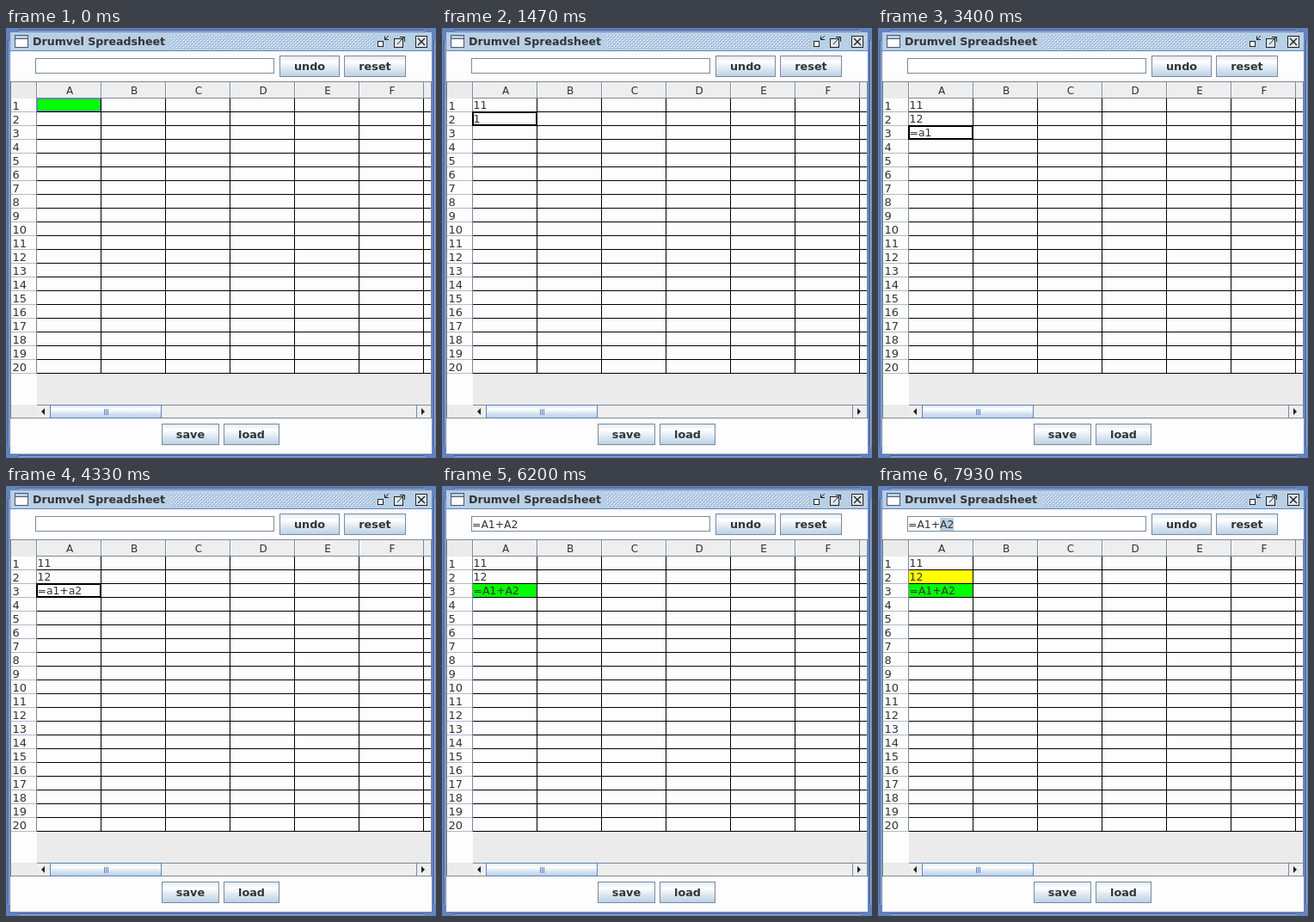
These frames come from a looping animation (500 px wide and 500 px high, 8000 ms). An HTML page with a canvas:

```html
<!DOCTYPE html>
<html lang="en">
<head>
<meta charset="utf-8">
<title>Spreadsheet</title>
<style>
html, body { margin: 0; width: 100%; height: 100%; overflow: hidden; background: #fdfdfe; }
canvas { display: block; width: 100%; height: 100%; }
</style>
</head>
<body>
<canvas id="stage" width="500" height="500"></canvas>
<script>
const ctx = document.getElementById('stage').getContext('2d');
const LOOP = 8000;
const SANS = '"DejaVu Sans", sans-serif';
const CELL = '12.4px ' + SANS;
const INK = '#333333', PAPER = '#fdfdfe', PANEL = '#ebebeb', EDGE = '#7a8a99';
const SKY = '#b8cfe5', MIST = '#dde8f3', BLUE = '#6382bf';
const LEFT = 36, TOP = 82, COL = 75, ROW = 16, ROWS = 20;

// Each step takes effect at its time: cells of column A, active row, mode.
const steps = [
  { at: 0, cells: [], row: 1 },
  { at: 470, cells: ['1'], row: 1, edit: true },
  { at: 730, cells: ['11'], row: 1, edit: true },
  { at: 1130, cells: ['11'], row: 2 },
  { at: 1470, cells: ['11', '1'], row: 2, edit: true },
  { at: 1730, cells: ['11', '12'], row: 2, edit: true },
  { at: 2070, cells: ['11', '12'], row: 3 },
  { at: 2800, cells: ['11', '12', '='], row: 3, edit: true },
  { at: 3070, cells: ['11', '12', '=a'], row: 3, edit: true },
  { at: 3330, cells: ['11', '12', '=a1'], row: 3, edit: true },
  { at: 3670, cells: ['11', '12', '=a1+'], row: 3, edit: true },
  { at: 4070, cells: ['11', '12', '=a1+a'], row: 3, edit: true },
  { at: 4330, cells: ['11', '12', '=a1+a2'], row: 3, edit: true },
  { at: 4800, cells: ['11', '12', '23'], row: 4 },
  { at: 5800, cells: ['11', '12', '=A1+A2'], row: 3, formula: '=A1+A2' },
  { at: 7070, cells: ['11', '12', '=A1+A2'], row: 3, formula: '=A1+A2', marked: 2 }
];

function box(x, y, w, h, color) {
  ctx.fillStyle = color;
  ctx.fillRect(x, y, w, h);
}

function frame(x, y, w, h, color, size = 1) {
  ctx.strokeStyle = color;
  ctx.lineWidth = size;
  ctx.strokeRect(x + size / 2, y + size / 2, w - size, h - size);
}

function text(s, x, y, font = CELL, align = 'left') {
  ctx.font = font;
  ctx.textAlign = align;
  ctx.fillStyle = INK;
  ctx.fillText(s, x, y);
}

function line(points, size = 1) {
  ctx.strokeStyle = '#222';
  ctx.lineWidth = size;
  ctx.beginPath();
  points.forEach(([x, y]) => ctx.lineTo(x, y));
  ctx.stroke();
}

function gloss(x, y, w, h) {
  const g = ctx.createLinearGradient(0, y, 0, y + h);
  g.addColorStop(0, MIST);
  g.addColorStop(0.3, '#ffffff');
  g.addColorStop(0.6, MIST);
  g.addColorStop(1, SKY);
  box(x, y, w, h, g);
}

function button(label, x, y, w) {
  gloss(x, y, w, 25);
  frame(x, y, w, 25, EDGE);
  text(label, x + w / 2, y + 17, 'bold 12.8px ' + SANS, 'center');
}

function windowEdge() {
  box(0, 0, 500, 500, BLUE);
  const dark = '#425a8c', pale = '#a3b8cc';
  for (const [near, color, start] of [[2, dark, 14], [3, pale, 15]]) {
    const far = near + 495;
    box(start, near, 472, 1, color);
    box(near, start, 1, 472, color);
    box(start, far, 472, 1, color);
    box(far, start, 1, 472, color);
  }
  box(5, 5, 490, 490, PAPER);
}

function titleBar() {
  box(5, 5, 490, 22, SKY);
  for (let y = 0; y < 16; y += 2) {
    for (let x = y % 4; x < 235; x += 4) {
      box(192 + x, 8 + y, 1, 1, '#ffffff');
      box(193 + x, 9 + y, 1, 1, '#7f9ccc');
    }
  }
  box(5, 26, 490, 1, BLUE);
  text('Drumvel Spreadsheet', 31, 20, 'bold 12.6px ' + SANS);

  box(11, 9, 14, 13, '#ffffff');
  box(11, 9, 14, 3, SKY);
  frame(10, 8, 16, 15, '#4d566b');
  box(11, 12, 14, 1, '#4d566b');

  windowControls();
}

function windowControls() {
  box(432, 15, 7, 7, '#ffffff');
  frame(432, 15, 7, 7, '#222');
  line([[445, 9], [440.5, 13.5]]);
  line([[440.5, 9.5], [440.5, 13.5], [445, 13.5]]);

  box(451, 12, 11, 11, MIST);
  frame(451, 12, 11, 11, '#222');
  line([[455, 19], [463, 10.5]]);
  line([[458, 10.5], [463.5, 10.5], [463.5, 16]]);

  box(476, 9, 14, 14, MIST);
  frame(476, 9, 14, 14, '#222');
  line([[479, 12], [487, 20]], 1.5);
  line([[487, 12], [479, 20]], 1.5);
}

function headers() {
  box(5, 62, 490, 392, EDGE);
  box(6, 63, 488, 390, PAPER);
  box(6, 63, 30, 19, PANEL);
  box(6, 438, 30, 15, PANEL);
  box(36, 63, 458, 19, '#eeeeee');
  box(36, 81, 458, 1, EDGE);
  for (let i = 0; i < 6; i++) {
    const x = LEFT + i * COL;
    box(x, 63, 1, 18, '#ffffff');
    box(x + COL - 1, 63, 1, 18, EDGE);
    text('ABCDEF'[i], x + 38, 77, '12px ' + SANS, 'center');
  }
  for (let r = 0; r < ROWS; r++) {
    const y = TOP + r * ROW;
    box(6, y + 15, 29, 1, '#b0bac6');
    text(r + 1, 7.5, y + 13, '13px ' + SANS);
  }
  box(35, 63, 1, 339, EDGE);
}

function arrow(x, dir) {
  ctx.fillStyle = '#222';
  ctx.beginPath();
  ctx.moveTo(x - 2 * dir, 442);
  ctx.lineTo(x + 2 * dir, 446);
  ctx.lineTo(x - 2 * dir, 450);
  ctx.fill();
}

function scrollBar() {
  box(36, 402, 458, 36, PANEL);
  box(36, 438, 458, 16, '#eeeeee');
  box(36, 438, 458, 1, EDGE);
  box(36, 453, 458, 1, EDGE);
  box(51, 439, 1, 14, EDGE);
  box(477, 439, 1, 14, EDGE);
  arrow(43, -1);
  arrow(485, 1);
  gloss(52, 439, 128, 14);
  frame(51, 438, 130, 16, BLUE);
  for (let x = 114; x < 120; x += 2) {
    box(x, 443, 1, 7, BLUE);
  }
}

function grid(s) {
  box(36, 82, 458, 320, PAPER);
  if (s.marked) box(LEFT, TOP + (s.marked - 1) * ROW, 74, 15, '#ffff00');
  const y = TOP + (s.row - 1) * ROW;
  if (!s.edit) {
    box(LEFT, y, 74, 15, '#00ff00');
    if (!s.formula) frame(LEFT, y, 74, 15, BLUE);
  }
  for (let r = 1; r <= ROWS; r++) box(36, TOP + r * ROW - 1, 458, 1, '#000');
  for (let c = 1; c <= 6; c++) box(LEFT + c * COL - 1, 82, 1, 320, '#000');
  if (s.edit) frame(35, y - 1, 76, 17, '#000', 2);
  s.cells.forEach((v, i) => text(v, 36.5, TOP + i * ROW + 12));
}

function formulaField(s) {
  box(34, 36, 278, 17, '#ffffff');
  frame(34, 35, 278, 18, EDGE);
  if (!s.formula) return;
  ctx.font = CELL;
  if (s.marked) {
    const start = 35 + ctx.measureText('=A1+').width;
    box(Math.round(start), 37, Math.round(ctx.measureText('A2').width), 15, SKY);
  }
  text(s.formula, 35, 49);
}

function draw(now) {
  const t = now % LOOP;
  const state = steps.filter(s => s.at <= t).pop();
  windowEdge();
  titleBar();
  formulaField(state);
  button('undo', 318, 32, 70);
  button('reset', 393, 32, 72);
  headers();
  grid(state);
  scrollBar();
  button('save', 181, 460, 67);
  button('load', 253, 460, 65);
}

const begin = performance.now();
function tick() {
  draw(performance.now() - begin);
  requestAnimationFrame(tick);
}
tick();
</script>
</body>
</html>
```
